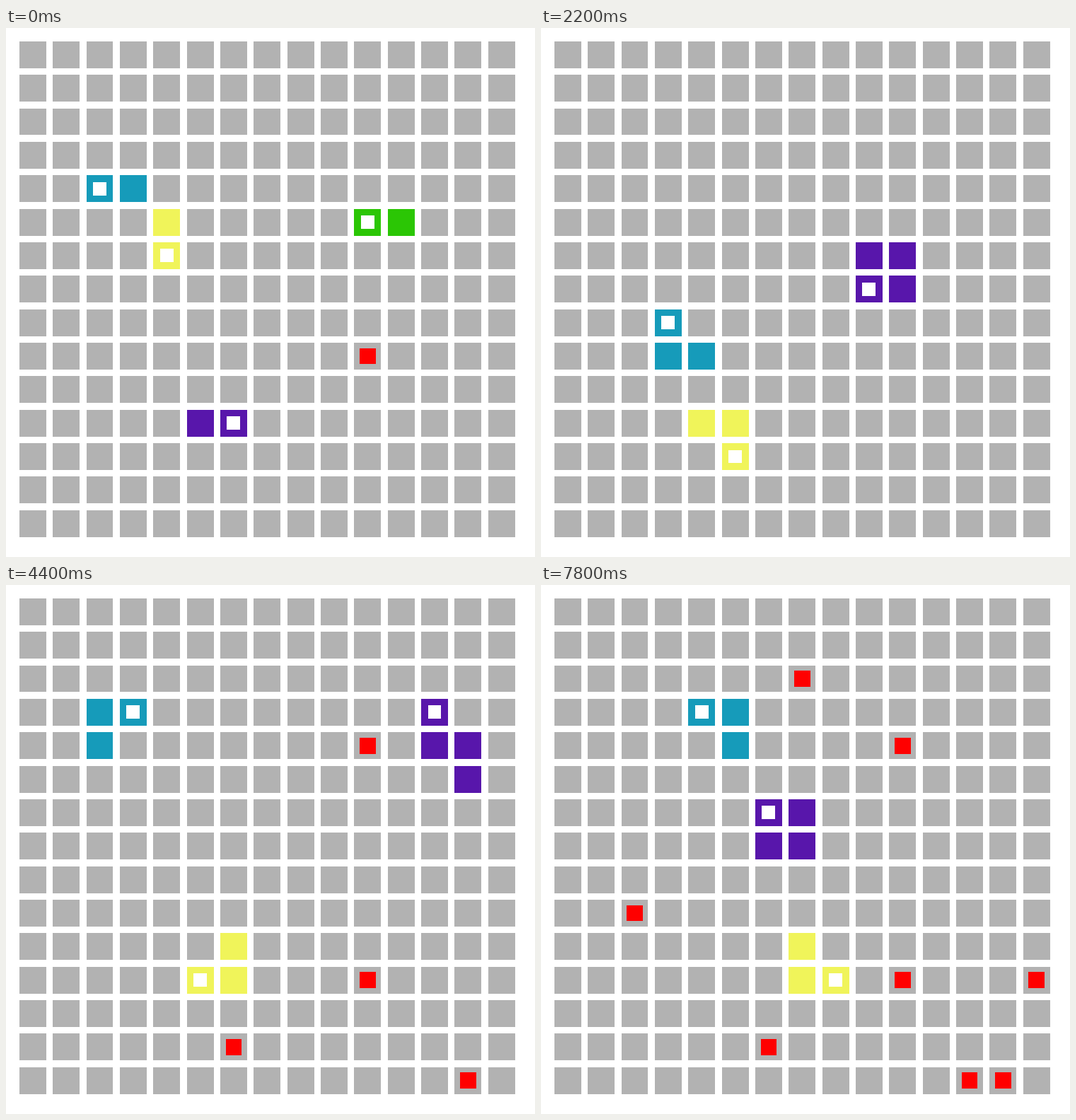
These frames come from a looping animation (748 px wide and 748 px high, 8 s). An HTML page:

```html
<!DOCTYPE html>
<html lang="en">
<head>
<meta charset="utf-8">
<title>Snakes</title>
<style>
  html, body { margin: 0; width: 100%; height: 100%; overflow: hidden; background: #fff; }
  svg { display: block; width: 100%; height: 100%; }
</style>
</head>
<body>
<svg viewBox="0 0 748 748" shape-rendering="crispEdges">
  <g id="board"></g>
  <g id="pieces"></g>
</svg>
<script>
const SIZE = 15, STEP = 200, STEPS = 40;
const UNIT = 748 / 79;
const DIRS = { U: [0, -1], D: [0, 1], L: [-1, 0], R: [1, 0] };

// Each path starts at the tail; its first move leads to the opening head cell.
const snakes = [
  { color: '#169bba', start: [3, 4], moves: 'LDDDRRDRDLLULURULLUURURRDDRULDLLURDRURUL' },
  { color: '#f0f45a', start: [4, 5], moves: 'DDDDDDLURDRDLLUURRURDDLULURDRDDRRUUULDDR' },
  { color: '#2bc605', start: [11, 5], moves: 'LLDLLDDRR' },
  { color: '#5816ab', start: [5, 11], moves: 'RRRURRUUUULDDRURURURULUULLULDDLDDLDLDRUL', growsAt: 7 }
];

// column, row, first step, step when eaten
const foods = [
  [10, 9, 0, 6], [10, 4, 15], [13, 14, 18], [10, 11, 20], [6, 13, 21],
  [14, 11, 24], [7, 2, 26], [12, 14, 27], [2, 9, 29]
];

for (const s of snakes) {
  s.path = [s.start];
  for (const m of s.moves) {
    const [x, y] = s.path[s.path.length - 1];
    s.path.push([x + DIRS[m][0], y + DIRS[m][1]]);
  }
}

const px = u => Math.round(u * UNIT);

function square([col, row], inset, color) {
  const x = 2 + col * 5 + inset, y = 2 + row * 5 + inset, side = 4 - 2 * inset;
  const left = px(x), top = px(y);
  return `<rect x="${left}" y="${top}" width="${px(x + side) - left}" height="${px(y + side) - top}" fill="${color}"/>`;
}

function drawSnake(s, step) {
  const head = step + 1;
  if (head >= s.path.length) return '';
  const length = step >= s.growsAt ? 4 : 3;
  const body = s.path.slice(Math.max(0, head - length + 1), head + 1);
  return body.map(c => square(c, 0, s.color)).join('') + square(s.path[head], 1, '#fff');
}

function drawStep(step) {
  const food = foods
    .filter(([, , from, to = STEPS]) => step >= from && step < to)
    .map(f => square(f, 0.8, '#f00'));
  return food.join('') + snakes.map(s => drawSnake(s, step)).join('');
}

let cells = '';
for (let row = 0; row < SIZE; row++)
  for (let col = 0; col < SIZE; col++) cells += square([col, row], 0, '#b2b2b2');
document.getElementById('board').innerHTML = cells;

const pieces = document.getElementById('pieces');
const began = performance.now();
let shown = -1;

function render() {
  const elapsed = Math.max(0, performance.now() - began);
  const step = Math.floor(elapsed / STEP) % STEPS;
  if (step !== shown) {
    pieces.innerHTML = drawStep(step);
    shown = step;
  }
  requestAnimationFrame(render);
}
render();
</script>
</body>
</html>
```
